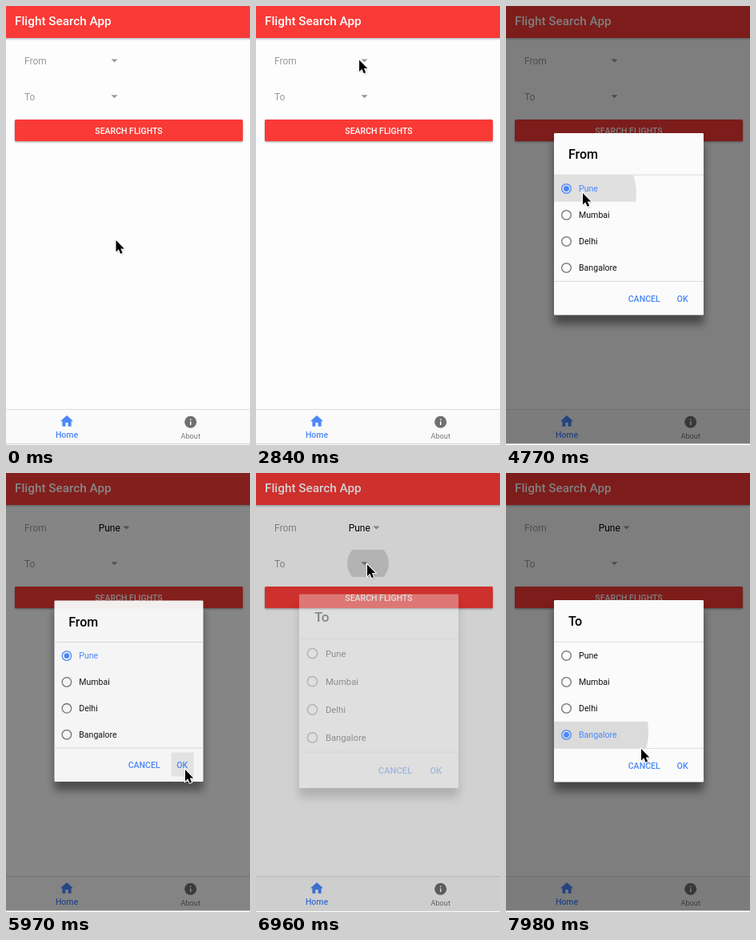
Recreate the animation shown at these times as an HTML page. Size 305 px wide and 549 px high, loop 8 s.

```html
<!DOCTYPE html>
<html lang="en">
<head>
<meta charset="utf-8">
<title>Flight Search App</title>
<style>
  html, body { margin: 0; width: 100%; height: 100%; overflow: hidden; background: #fff; }
  body > svg { display: block; width: 100vw; height: 100vh; font-family: Roboto, sans-serif; }
  .bold { font-weight: 500; }
  .blue { fill: #4a87fb; }
  .red { fill: #f93a36; }
  .label { font-size: 12px; fill: #999; }
  .option text { font-size: 10.6px; fill: #111; }
  .option circle { fill: none; stroke: #737373; stroke-width: 1.3; }
  .option .dot { display: none; }
  .option.on text { fill: #4a87fb; }
  .option.on circle { stroke: #4a87fb; }
  .option.on .dot { display: block; fill: #4a87fb; stroke: none; }
</style>
</head>
<body>
<svg viewBox="0 0 305 549" preserveAspectRatio="none">
  <defs>
    <filter id="soft" x="-20%" y="-20%" width="140%" height="140%"><feGaussianBlur stdDeviation="5.5"/></filter>
    <filter id="thin" x="-10%" y="-30%" width="120%" height="160%"><feGaussianBlur stdDeviation="1"/></filter>
  </defs>

  <rect width="305" height="549" fill="#fdfdfd"/>
  <rect x="-5" width="315" height="41.5" fill="#8794a6" opacity=".6" filter="url(#thin)"/>
  <rect class="red" width="305" height="40"/>
  <text class="bold" x="11" y="24.1" font-size="15.3" fill="#fff">Flight Search App</text>

  <text class="label" x="23" y="72.7">From</text>
  <text id="value" class="label" x="115.7" y="72.5" style="fill:#000">Pune</text>
  <path id="caret" d="M131.5 66.5h8l-4 4z" fill="#999"/>
  <text class="label" x="23" y="117.7">To</text>
  <path d="M131.5 111.3h8l-4 4z" fill="#999"/>

  <rect x="11" y="143" width="285" height="27.3" rx="1.5" opacity=".35" filter="url(#thin)"/>
  <rect class="red" x="11" y="142" width="285" height="27" rx="1.5"/>
  <text class="bold" x="153.5" y="159.5" font-size="10.5" fill="#fff" text-anchor="middle">SEARCH FLIGHTS</text>

  <rect y="504" width="305" height="43" fill="#fafafa"/>
  <rect y="504" width="305" height="1" fill="#dedede"/>
  <path class="blue" d="M76 512l8 7.2h-2.4v6.5h-4v-4.8h-3.2v4.8h-4v-6.5h-2.4z"/>
  <text class="bold blue" x="76" y="540.3" font-size="10.5" text-anchor="middle">Home</text>
  <circle cx="230.7" cy="520.3" r="7.5" fill="#707070"/>
  <path d="M230 516.5h1.5v1.5H230zM230 519.5h1.5v4.6H230z" fill="#fff"/>
  <text x="230.7" y="540.7" font-size="9.2" fill="#777" text-anchor="middle">About</text>

  <g id="fields"></g>
  <rect id="shade" width="305" height="547"/>
  <rect y="547" width="305" height="1" fill="#d2d2d2"/>
  <rect y="548" width="305" height="1" fill="#fbfbfb"/>

  <g id="dialog">
    <rect x="60" y="170" width="187" height="227.5" opacity=".45" filter="url(#soft)"/>
    <rect x="60" y="159" width="187" height="227.5" rx="1.3" fill="#fbfbfb"/>
    <g id="presses"></g>
    <text id="title" class="bold" x="77.9" y="191.3" font-size="16.1"></text>
    <path d="M60 211.2h187M60 344.4h187" stroke="#d9d9d9" stroke-width=".9"/>
    <g id="options"></g>
    <text class="bold blue" x="152.7" y="369.7" font-size="10.6">CANCEL</text>
    <text class="bold blue" x="213.6" y="369.7" font-size="10.6">OK</text>
  </g>

  <g id="cursor">
    <path d="M1 2v14l3.4-3.2 2.4 5.4 2.4-1-2.2-5.2h4.5z" opacity=".3" filter="url(#thin)"/>
    <path d="M0 0v14.4l3.3-3.1 2.4 5.5 2.4-1-2.3-5.3h4.5z" stroke="#fff" stroke-width="2" paint-order="stroke"/>
  </g>
</svg>
<script>
const LOOP = 8000;
const SECOND = 6380; // second half: choosing the destination
const $ = id => document.getElementById(id);
const progress = (t, start, length) => Math.max(0, Math.min(1, (t - start) / length));
const easeOut = u => u * (2 - u);

function add(parent, tag, attrs, text) {
  const node = document.createElementNS('http://www.w3.org/2000/svg', tag);
  for (const key in attrs) node.setAttribute(key, attrs[key]);
  if (text) node.textContent = text;
  return parent.appendChild(node);
}

const options = ['Pune', 'Mumbai', 'Delhi', 'Bangalore'].map((name, i) => {
  const y = 228.4 + 33 * i;
  const row = add($('options'), 'g', { class: 'option' });
  add(row, 'circle', { cx: 75.5, cy: y, r: 5.8 });
  add(row, 'circle', { class: 'dot', cx: 75.5, cy: y, r: 3.4 });
  add(row, 'text', { x: 91, y: y + 3.8 }, name);
  return row;
});

// Pointer stops, each reached from the one before
const home = { x: 137.5, y: 293 };
const moves = [
  { at: 0, length: 300, x: 139.5, y: 66 },
  { at: 500, length: 245, x: 129, y: 67.5 },
  { at: 2830, length: 150, x: 133, y: 70 },
  { at: 3950, length: 600, x: 96, y: 234 },
  { at: 4770, length: 230, x: 224, y: 371 },
  { at: 6170, length: 500, x: 139, y: 114.5 },
  { at: 7110, length: 580, x: 93, y: 324 },
  { at: 7840, length: 130, x: 169, y: 345 }
];

function pointer(t) {
  let { x, y } = home;
  for (const move of moves) {
    const u = easeOut(progress(t, move.at, move.length));
    x += (move.x - x) * u;
    y += (move.y - y) * u;
  }
  return `translate(${x} ${y})`;
}

// Press ink: a growing disc clipped to its box
function ripple(layer, start, cx, cy, alpha, box) {
  const frame = add($(layer), 'svg', { ...box, viewBox: `${box.x} ${box.y} ${box.width} ${box.height}` });
  return { start, node: add(frame, 'circle', { cx, cy, opacity: alpha }) };
}
const field = y => ({ x: 0, y, width: 305, height: 34 });
const optionRow = i => ({ x: 60, y: 211.5 + 33.1 * i, width: 187, height: 33.3 });
const ripples = [
  ripple('fields', 3402, 132, 68, .13, field(51)),
  ripple('fields', 6886, 140, 113, .14, field(96)),
  ripple('presses', 4574, 95, 234, .11, optionRow(0)),
  ripple('presses', 5795, 221, 365, .08, { x: 207, y: 350, width: 28, height: 30 }),
  ripple('presses', 7732, 93, 324, .13, optionRow(3))
];

// The screen refreshes about seven times a second
function refreshTime(t) {
  const [base, step] = t < SECOND ? [0, 149] : [SECOND, 145];
  return base + step * Math.floor((t - base) / step);
}

function draw(now) {
  const t = refreshTime(now % LOOP);
  const second = t >= SECOND;
  const enter = progress(t, second ? 6890 : 3406, 200);
  const leave = second ? 0 : progress(t, 5950, 200);
  const shown = enter * (1 - leave);
  const scale = 1.1 - .1 * enter - .1 * leave;

  $('cursor').setAttribute('transform', pointer(t));
  $('shade').setAttribute('opacity', shown / 2);
  $('dialog').setAttribute('opacity', shown);
  $('dialog').setAttribute('transform',
    `translate(153.5 272.7) scale(${scale}) translate(-153.5 -272.7)`);
  $('title').textContent = second ? 'To' : 'From';

  const picked = second ? (t > 7800 ? 3 : -1) : (t > 4600 ? 0 : -1);
  options.forEach((row, i) => row.classList.toggle('on', i === picked));

  const chosen = t > 5950;
  $('value').setAttribute('opacity', +chosen);
  $('caret').setAttribute('transform', `translate(${chosen ? 15 : 0} 0)`);

  for (const { start, node } of ripples) {
    const age = t - start;
    node.setAttribute('r', age > 0 && age < 300 ? .35 * age : 0);
  }
}

const begin = performance.now();
(function tick() {
  draw(performance.now() - begin);
  requestAnimationFrame(tick);
})();
</script>
</body>
</html>
```
